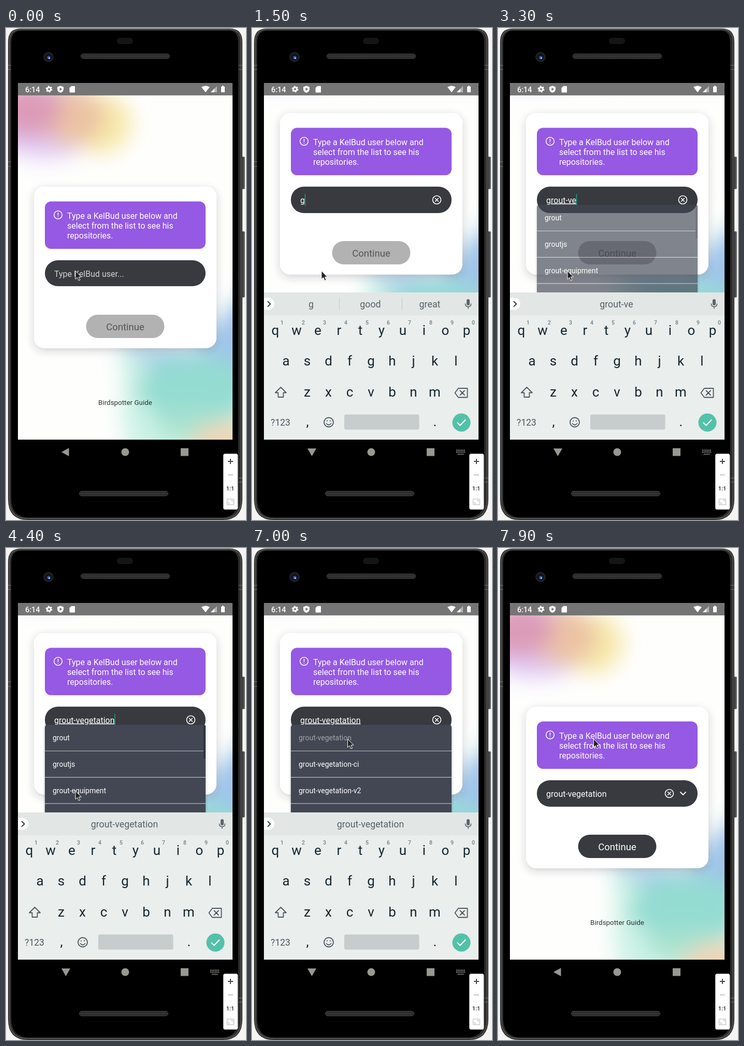
An HTML page for the animation above (8000 ms loop, 463 px wide and 949 px high).

```html
<!DOCTYPE html>
<html lang="en">
<head>
<meta charset="utf-8">
<title>User search</title>
<style>
  html, body { margin: 0; width: 100%; height: 100%; overflow: hidden; background: #f5f4f3; }
  svg { display: block; font-family: Roboto, sans-serif; }
  .mid { text-anchor: middle; }
  .line { fill: none; stroke-linecap: round; stroke-linejoin: round; }
</style>
</head>
<body>
<svg width="463" height="949" viewBox="0 0 463 949">
  <defs>
    <filter id="soft" x="-60%" y="-60%" width="220%" height="220%"><feGaussianBlur stdDeviation="20"/></filter>
    <filter id="lift" x="-20%" y="-20%" width="140%" height="140%">
      <feDropShadow dx="0" dy="5" stdDeviation="8" flood-color="#334" flood-opacity=".22"/>
    </filter>
    <filter id="small" x="-20%" y="-20%" width="140%" height="140%">
      <feDropShadow dx="0" dy="2" stdDeviation="2.5" flood-opacity=".3"/>
    </filter>
    <clipPath id="screen"><path d="M23 130H437V794H23z"/></clipPath>
    <clipPath id="column"><path d="M23 500H437V860H23z"/></clipPath>
  </defs>

  <!-- phone body -->
  <g fill="#4c4d4c" stroke="#858583">
    <rect x="454.500" y="248.500" width="6" height="62" rx="1.500"/>
    <rect x="454.500" y="392.500" width="6" height="127" rx="1.500"/>
  </g>
  <path d="M28 1H432Q456 1 456 27V909Q456 949 418 949H42Q4 949 4 909V27Q4 1 28 1z" fill="#2c2d2c"/>
  <path d="M28 3H432Q453.500 3 453.500 27V909Q453.500 946.500 418 946.500H42Q6.500 946.500 6.500 909V27Q6.500 3 28 3z"
    fill="none" stroke="#5c5d5b" stroke-width="1.500"/>
  <path d="M4 72h6M4 80h6M4 258h6M4 267h6M449 72h7M449 80h7M449 868h7M449 876h7" stroke="#777975"/>
  <path d="M30 5H430Q448 5 448 29V907Q448 944 416 944H44Q10 944 10 907V29Q10 5 30 5z"/>
  <rect x="214" y="19" width="31" height="12" rx="6" fill="#151515"/>
  <circle cx="82" cy="56" r="10" fill="#1d1e20"/>
  <circle cx="82" cy="56" r="6" fill="#0b1020"/>
  <circle cx="82.500" cy="57" r="3.300" fill="#34549c"/>
  <circle cx="83.500" cy="58" r="1.500" fill="#c3d2f0"/>
  <g fill="#282828" stroke="#4a4a4a">
    <rect x="144.500" y="50" width="171" height="9" rx="4.500"/>
    <rect x="141.500" y="893.500" width="171" height="9" rx="4.500"/>
  </g>
  <path d="M148 54.500h164M145 898h164" stroke="#444" stroke-width="4" stroke-dasharray="1 1.500"/>

  <!-- status bar -->
  <rect x="23" y="106" width="414" height="24" fill="#757575"/>
  <g fill="#fff">
    <text x="37" y="123.500" font-size="14.500" font-weight="500">6:14</text>
    <circle cx="83" cy="118" r="3.500" fill="none" stroke="#fff" stroke-width="3"/>
    <circle cx="83" cy="118" r="5.500" fill="none" stroke="#fff" stroke-width="2" stroke-dasharray="2.600 3.160"/>
    <path d="M105 111.500l6 2.300v4.200q0 5-6 7q-6-2-6-7v-4.200z"/>
    <path d="M103.500 115v6l5-3z" fill="#757575"/>
    <path d="M126 112h6q1 0 1 1v10q0 1.500-1 1.500h-8q-1.500 0-1.500-1.500v-7.500z"/>
    <path d="M377 114q8-5 16 0l-8 10z"/>
    <path d="M407 112v12h-12z" opacity=".45"/><path d="M402 117v7h-7z"/>
    <path d="M417 111.500h3v1.500h2v11h-7v-11h2z"/>
  </g>

  <!-- app -->
  <g clip-path="url(#screen)">
    <rect x="23" y="130" width="414" height="664" fill="#fefefd"/>
    <g id="app">
      <g filter="url(#soft)">
        <ellipse cx="75" cy="175" rx="115" ry="75" fill="#d9bbf3" opacity=".8"/>
        <ellipse cx="182" cy="184" rx="60" ry="58" fill="#f7e8a8"/>
        <ellipse cx="125" cy="170" rx="66" ry="56" fill="#ebc3a4"/>
        <ellipse cx="40" cy="158" rx="68" ry="52" fill="#dc9bb8"/>
        <path d="M480 485Q415 550 370 620H212Q235 670 222 730L235 830H480z" fill="#cdf2e6"/>
        <path d="M490 500Q412 545 370 620L220 610Q270 670 490 660z" fill="#9fc4ea"/>
        <ellipse cx="365" cy="695" rx="112" ry="64" fill="#94dcd2"/>
        <ellipse cx="360" cy="765" rx="75" ry="30" fill="#a9e2cf"/>
        <ellipse cx="435" cy="810" rx="80" ry="50" fill="#f0d6b6"/>
      </g>
      <text class="mid" x="230" y="727" font-size="13.400" fill="#333">Birdspotter Guide</text>
      <rect x="54" y="306" width="352" height="311.500" rx="20" fill="#fff" filter="url(#lift)"/>
      <rect x="75" y="334.500" width="310" height="91.500" rx="12" fill="#9559e4"/>
      <g class="line" stroke="#fff" stroke-width="1.500">
        <circle cx="100.500" cy="360.500" r="7.800"/><path d="M100.500 356.500v4.500M100.500 364.300v.1"/>
      </g>
      <g font-size="16" fill="#fff">
        <text x="118" y="368">Type a KelBud user below and</text>
        <text x="118" y="387">select from the list to see his</text>
        <text x="118" y="406">repositories.</text>
      </g>
      <rect id="field" x="75" y="448" width="310" rx="25"  fill="#383a40"/>
      <text id="entry" x="93" y="479.500" font-size="16"></text>
      <path id="caret" d="M0 462v23" stroke="#219b86" stroke-width="1.500"/>
      <g class="line" stroke="#fff" stroke-width="1.600">
        <g id="clear"><circle r="8"/><path d="M-3-3l6 6M3-3l-6 6"/></g>
        <path id="chevron" d="M-5-2.500l5 5l5-5" stroke-width="1.800"/>
        <path id="spinner" d="M0-7A7 7 0 1 1-7 0" stroke-width="2"/>
      </g>
      <rect id="button" x="154.500" y="553" width="151" height="45" rx="22.500"/>
      <text id="buttonText" class="mid" x="230" y="582.500" font-size="18.500">Continue</text>
      <g id="list" font-size="14" fill="#fff">
        <path d="M75 488q0-5 5-5h300q5 0 5 5v220h-310z" fill="#434753" filter="url(#small)"/>
        <path d="M75 533.500h310M75 584.300h310M75 634.800h310" stroke="#b9bbc0" stroke-width="1.200"/>
        <text x="90" y="513"></text><text x="90" y="564"></text><text x="90" y="615"></text>
        <rect id="scroll" x="381" y="484" width="4" height="64" fill="#30343e"/>
      </g>
    </g>
    <rect id="cover" x="23" y="510" width="414" height="284" fill="#fdfdfc"/>
  </g>

  <!-- keyboard -->
  <g clip-path="url(#column)"><g id="keyboard">
    <rect x="23" y="510" width="414" height="284" fill="#eaeeed"/>
    <rect x="23" y="510" width="414" height="44.500" fill="#e2e6e5"/>
    <rect x="10" y="520.500" width="33" height="23" rx="11.500" fill="#fff"/>
    <path class="line" d="M30.500 527.500l5 4.800l-5 4.800" stroke="#333c40" stroke-width="2"/>
    <path id="dividers" d="M168.500 520v24M289.500 520v24" stroke="#c6cccc"/>
    <g id="hints" class="mid"><text y="539"></text><text y="539"></text><text y="539"></text></g>
    <rect x="414" y="523" width="6" height="12" rx="3" fill="#5a666a"/>
    <path class="line" d="M411.500 532q0 5.500 5.500 5.500t5.500-5.500M417 538v3" stroke="#5a666a" stroke-width="1.600"/>
    <g id="keys" class="mid" fill="#15262d" font-size="26"></g>
    <g class="line" stroke="#4b585d" stroke-width="1.800">
      <path d="M55.500 693l-10.500 10.500h5.500v8.500h10v-8.500h5.500z"/>
      <path d="M398 695h17.500v17.500h-17.500l-6.500-8.700zM401.500 699.500l8.500 8.500M410 699.500l-8.500 8.500"/>
      <circle cx="148" cy="760.500" r="9"/><path d="M143.500 763q4.500 5 9 0M145 757.500v.6M151 757.500v.6"/>
    </g>
    <text class="mid" x="55" y="766.500" font-size="17.500" fill="#4b585d">?123</text>
    <rect x="178" y="745.500" width="144.500" height="29" rx="3" fill="#c6cdcc"/>
    <circle cx="404" cy="761" r="17.500" fill="#53c1a9"/>
    <path class="line" d="M396.500 761.500l5 5l10-10.500" stroke="#fff" stroke-width="2"/>
  </g></g>

  <!-- navigation bar -->
  <g fill="#989892">
    <path id="back"/>
    <circle cx="230" cy="818" r="7.500"/><path d="M337 810.500h15v15h-15z"/>
    <path id="switcher" d="M394 814.500h17M394 818h17M397 822h11" stroke="#989892" stroke-width="2" stroke-dasharray="2 1"/>
  </g>

  <!-- zoom panel -->
  <rect x="419.500" y="821.500" width="27.500" height="107" rx="3" fill="#fff" stroke="#ccc" filter="url(#small)"/>
  <path d="M428 836h10M433 831v10" stroke="#444" stroke-width="2"/>
  <path d="M428 862h10" stroke="#b5b5b5" stroke-width="1.500"/>
  <text class="mid" x="432.500" y="892" font-size="11" font-weight="700" fill="#444">1:1</text>
  <path d="M426.500 908.500h13v11h-13zM429 914v3h3M434 911h3v3" fill="none" stroke="#b5b5b5"/>

  <path id="mouse" d="M0 0v16l3.600-3.300l2.700 6l2.700-1.200l-2.600-5.800h5z" fill="#222" stroke="#fff"/>
</svg>
<script>
const $ = id => document.getElementById(id);
const show = (id, on) => $(id).setAttribute('opacity', +on);
const move = (id, x, y, turn = 0) => $(id).setAttribute('transform', `translate(${x} ${y}) rotate(${turn})`);
const within = (t, ...spans) => spans.some(([from, to]) => t >= from && t < to);
const latest = (t, steps) => steps.reduce((value, [at, next]) => t >= at ? next : value, null);

function tween(t, keys) {
  const i = keys.findIndex(([at]) => t < at);
  if (i === 0) return keys[0][1];
  if (i < 0) return keys[keys.length - 1][1];
  const [t0, a] = keys[i - 1], [t1, b] = keys[i];
  return a + (b - a) * (t - t0) / (t1 - t0);
}

const label = (x, y, text, extra = '') => `<text x="${x}" y="${y}" ${extra}>${text}</text>`;
const row = (letters, x, y) => [...letters].map((c, i) => label(x + i * 41, y, c)).join('');
$('keys').innerHTML = row('qwertyuiop', 45, 592) + row('asdfghjkl', 65.5, 651) + row('zxcvbnm', 106.5, 711)
  + label(107, 768, ',') + label(353, 768, '.')
  + [...'1234567890'].map((c, i) => label(58 + i * 41, 572, c, 'font-size="10.500" font-weight="500" fill="#737d80"')).join('');

const word = 'grout-vegetation';
const typed = [[0, 0], [1500, 1], [1600, 2], [1800, 3], [2100, 5], [2700, 6], [3000, 7], [3200, 8], [3400, 9],
  [3500, 10], [3700, 11], [3800, 12], [4100, 13], [4200, 15], [4400, 16]];
const hintSets = [[1500, ['g', 'good', 'great']], [1600, ['gr', 'great', 'group']],
  [1800, ['gro', 'group', 'ground']], [2100, ['grout', 'grouting', 'groutings']]];
const firstUsers = ['grout', 'groutjs', 'grout-equipment'];
const foundUsers = [word, word + '-ci', word + '-v2'];

function setHints(t, text) {
  const hints = text.length > 5 ? ['', text, ''] : latest(t, hintSets) || ['', 'Suggest contacts? Tap for info.', ''];
  const idle = !text;
  $('hints').setAttribute('font-size', idle ? 16 : 17.8);
  $('hints').setAttribute('fill', idle ? '#62c7b2' : '#566267');
  [...$('hints').children].forEach((node, i) => {
    node.textContent = hints[i];
    node.setAttribute('x', 114 + i * 114.5);
  });
  show('dividers', hints[0] !== '');
}

function render(t) {
  const open = within(t, [500, 7500]), chosen = t >= 7500;
  const text = word.slice(0, latest(t, typed));
  move('app', 0, open ? -142 : 0);
  show('cover', open);

  const entry = $('entry');
  entry.textContent = text || 'Type KelBud user...';
  entry.setAttribute('fill', text ? '#fff' : '#d0d1d3');
  entry.setAttribute('text-decoration', text && !chosen ? 'underline' : 'none');
  $('field').setAttribute('height', text ? 51 : 50);
  show('caret', within(t, [500, 1100], [1500, 2600], [2700, 4900], [5400, 6000], [6500, 7000]));
  move('caret', text ? 93.5 + entry.getComputedTextLength() : 94, 0);

  const loading = within(t, [2700, 3200], [4900, 5300]);
  show('clear', text !== '' && !loading);
  move('clear', chosen ? 330.5 : 356.5, 473.5);
  show('spinner', loading);
  move('spinner', 356.5, 473.5, t * .4);
  show('chevron', chosen);
  move('chevron', 357, 473.5, tween(t, [[7500, 90], [7700, 0]]));
  $('button').setAttribute('fill', chosen ? '#383a40' : '#b2b2b2');
  $('buttonText').setAttribute('fill', chosen ? '#fff' : '#555');

  show('list', tween(t,
    [[3100, 0], [3400, 1], [3600, 1], [3800, 0], [4000, 0], [4200, 1], [7499, 1], [7500, 0]]));
  const users = t < 5300 ? firstUsers : foundUsers;
  $('list').querySelectorAll('text').forEach((node, i) => {
    node.textContent = users[i];
    node.setAttribute('opacity', i ? 1 : tween(t, [[6800, 1], [6900, .6], [7000, .5]]));
  });
  show('scroll', tween(t, [[4900, 1], [5100, 0], [5200, 0], [5300, 1], [5400, 1], [5600, 0]]));

  setHints(t, text);
  move('keyboard', 0, tween(t, [[500, 32], [600, 16], [700, 4], [800, 0], [7400, 0], [7500, 9.5], [7600, 24], [7800, 48]]));
  show('keyboard', tween(t,
    [[499, 0], [500, .4], [600, .8], [700, .96], [800, 1], [7400, 1], [7500, .78], [7600, .45], [7800, 0]]));
  $('back').setAttribute('d', open ? 'M107 811h17l-8.500 15z' : 'M107 818l14.500-8v16z');
  show('switcher', open);

  move('mouse', tween(t, [[6000, 134], [6200, 178], [6400, 178], [6700, 184.5]]),
    tween(t, [[6000, 468.5], [6200, 400], [6400, 400], [6700, 368.5]]));
}

function frame() {
  render(Math.floor(performance.now() % 8000 / 100) * 100);
  requestAnimationFrame(frame);
}
frame();
</script>
</body>
</html>
```
